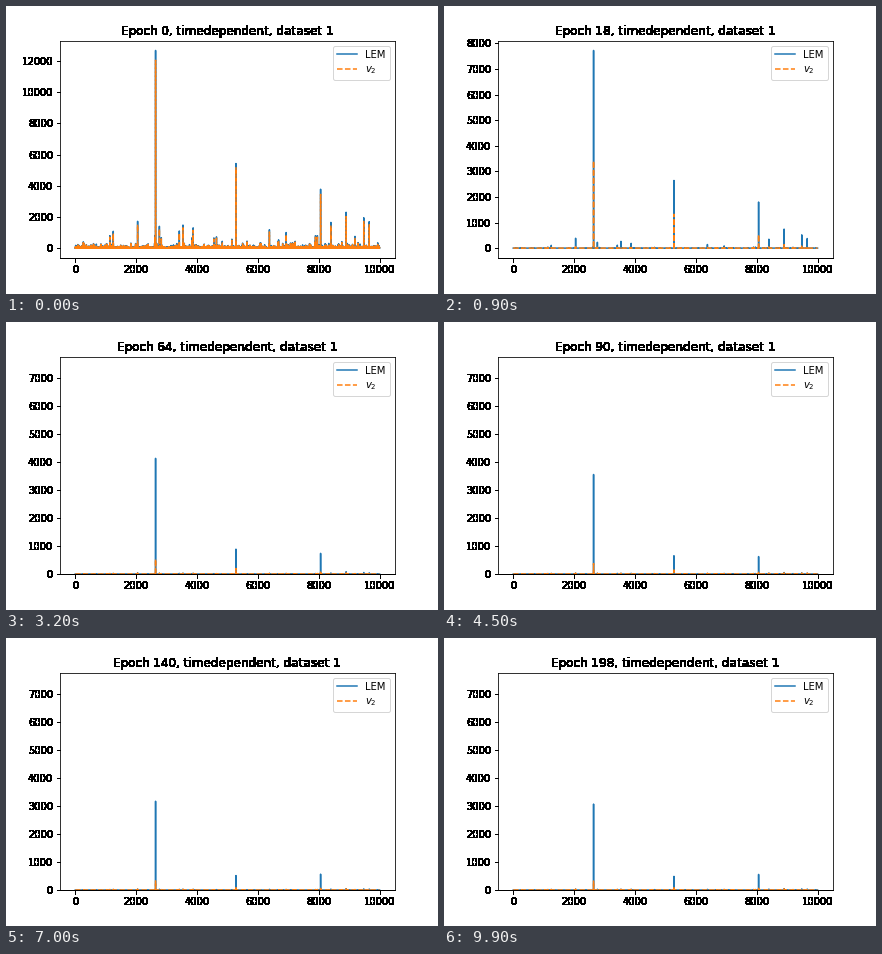
Animation, 432 px wide and 288 px high, one loop 10000 ms. Source, as a matplotlib script:

```python
import numpy as np
import matplotlib.pyplot as plt
from matplotlib.animation import FuncAnimation

N = 10001
FRAMES, INTERVAL, EPOCH_STEP = 100, 100, 2
FREEZE_EPOCH, TOP = 20, 7766

# Dominant peaks: position, then (start, end, rate) for LEM and v2
PEAKS = [
    (2640, (12690, 3040, 0.0585), (12060, 320, 0.108)),
    (5281, (5430, 480, 0.067), (5160, 130, 0.1165)),
    (8062, (3780, 555, 0.077), (3450, 60, 0.16)),
]
SPIKES = {1250: 1080, 2050: 1720, 2765: 1400, 3420: 1100, 3540: 1480,
          3875: 1300, 6380: 1180, 6930: 1000, 8400: 1650, 8900: 2300,
          9480: 1950, 9660: 1700}

# Heavy-tailed background; taller samples fade more slowly
rng = np.random.default_rng(4)
base = np.minimum(rng.lognormal(np.log(6), 1.5, N), 800)
base[list(SPIKES)] = list(SPIKES.values())
fade = np.clip(150 / base, 0.06, 0.25)


def curve(epoch, which, scale=1.0, speed=1.0):
    y = scale * base * (0.02 + 0.98 * np.exp(-speed * fade * epoch))
    for peak in PEAKS:
        start, end, rate = peak[which]
        y[peak[0]] = end + (start - end) * np.exp(-rate * epoch ** 0.87)
    return y


def lem(epoch):
    return curve(epoch, 1)


def v2(epoch):
    return curve(epoch, 2, scale=0.88, speed=2.6)


def harden(image, dpi):
    """Turn every touched pixel solid black."""
    out = np.zeros_like(image)
    out[..., 3] = image[..., 3] > 0
    return out, 0, 0


fig = plt.figure(figsize=(6, 4), dpi=72, facecolor="white")
ax = fig.add_axes([0.125, 0.125, 0.775, 0.755])
lem_line, = ax.plot(lem(0), label="LEM")
v2_line, = ax.plot(v2(0), "--", label="$v_2$")
ax.set_xlim(-500, 10500)
ax.legend(loc="upper right")
for artist in (ax.title, ax.xaxis, ax.yaxis, ax.spines["bottom"]):
    artist.set_agg_filter(harden)


def update(frame):
    epoch = frame * EPOCH_STEP
    y = lem(epoch)
    lem_line.set_ydata(y)
    v2_line.set_ydata(v2(epoch))
    if epoch < FREEZE_EPOCH:
        ax.set_ylim(-0.05 * y.max(), 1.05 * y.max())
    else:
        ax.set_ylim(0, TOP)
    ax.set_title(f"Epoch {epoch}, timedependent, dataset 1")
    return lem_line, v2_line


anim = FuncAnimation(fig, update, frames=FRAMES, interval=INTERVAL,
                     repeat=True, repeat_delay=0)
plt.show()
```
